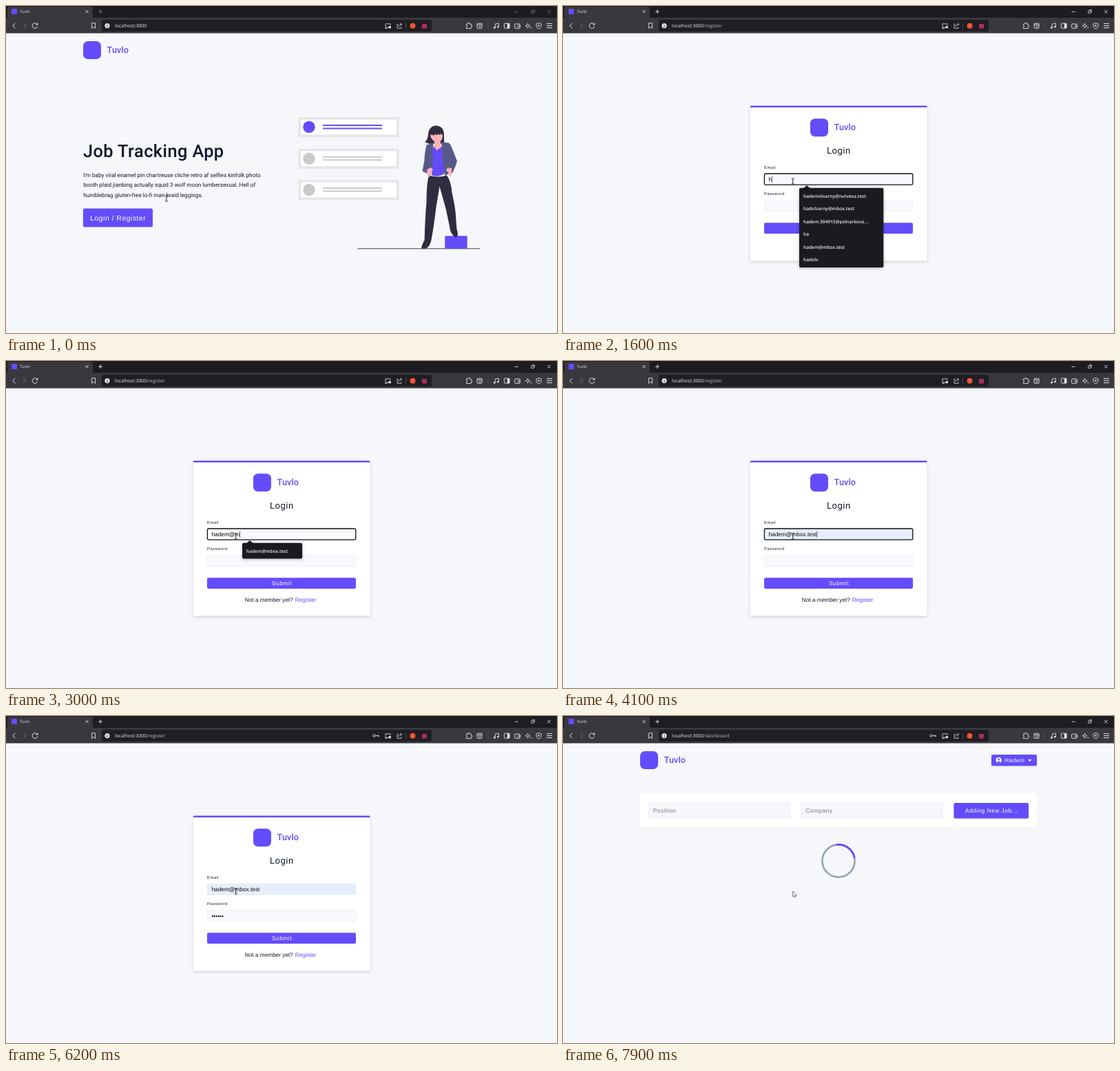
Write an HTML page with a canvas that moves like this. It is 800 px wide and 474 px high and loops after 8 s.

```html
<!DOCTYPE html>
<html lang="en">
<head>
<meta charset="utf-8">
<title>Tuvlo</title>
<style>
html, body { margin: 0; width: 100%; height: 100%; overflow: hidden; background: #f6f7fb; }
canvas { display: block; width: 800px; height: 474px; }
</style>
</head>
<body>
<canvas id="stage" width="800" height="474"></canvas>
<script>
const ctx = document.getElementById('stage').getContext('2d');
const LOOP = 8000, STEP = 100;
const PURPLE = '#644cfa', INK = '#0f172a', PAGE = '#f6f7fb', FIELD = '#f8f9fc';
const ARIAL = '"Liberation Sans", Arial, sans-serif';
const ROBOTO = 'Roboto, sans-serif';
const UI = '"Open Sans", "Noto Sans", sans-serif';
const REM = 8.333, GAP = 0.52;

const BRAND = 'Tuvlo', USER = 'Hadem', EMAIL = 'hadem@mbox.test';
const SAVED = ['hademolvarny@nulvexa.test', 'hadolvarny@mbox.test',
  'hadem.304915@pelnarkova....', 'ha', EMAIL, 'hadolv'];

const T = { active: 100, hover: 400, register: 800, leave: 1000, focus: 1300,
  filled: 3500, password: 4300, key: 4800, blur: 6000, dashboard: 7600 };
const EMAIL_KEYS = [1500, 1900, 2100, 2300, 2500, 2800, 3000];
const PASS_KEYS = [4700, 4900, 5000, 5200, 5300, 5500];

const typed = (keys, t) => keys.filter(k => k <= t).length;

function rect(x, y, w, h, fill, r = 0) {
  ctx.fillStyle = fill;
  ctx.beginPath();
  ctx.roundRect(x, y, w, h, r);
  ctx.fill();
}
function frame(x, y, w, h, color, line = 1, r = 0) {
  ctx.strokeStyle = color;
  ctx.lineWidth = line;
  ctx.beginPath();
  ctx.roundRect(x, y, w, h, r);
  ctx.stroke();
}
function disc(x, y, r, fill) {
  ctx.fillStyle = fill;
  ctx.beginPath();
  ctx.arc(x, y, r, 0, Math.PI * 2);
  ctx.fill();
}
function ring(x, y, r, color, line = 1, from = 0, to = Math.PI * 2) {
  ctx.strokeStyle = color;
  ctx.lineWidth = line;
  ctx.beginPath();
  ctx.arc(x, y, r, from, to);
  ctx.stroke();
}
function shape(d, fill) {
  ctx.fillStyle = fill;
  ctx.fill(new Path2D(d));
}
function stroke(d, color, line = 1) {
  ctx.strokeStyle = color;
  ctx.lineWidth = line;
  ctx.stroke(new Path2D(d));
}
function shadow(blur, dy, alpha, draw) {
  ctx.save();
  ctx.shadowColor = `rgba(0,0,0,${alpha})`;
  ctx.shadowBlur = blur;
  ctx.shadowOffsetY = dy;
  draw();
  ctx.restore();
}
function text(s, x, y, size, { font = ARIAL, weight = 400, color = INK, gap = 0, align = 'left' } = {}) {
  ctx.font = `${weight} ${size}px ${font}`;
  ctx.textRendering = 'geometricPrecision';
  ctx.letterSpacing = gap + 'px';
  ctx.textAlign = 'left';
  ctx.fillStyle = color;
  const w = ctx.measureText(s).width;
  ctx.fillText(s, align === 'center' ? x - (w - gap) / 2 : x, y);
  return w;
}

function brand(x, y) {
  rect(x, y, 26, 26, PURPLE, 7);
  text(BRAND, x + 34.6, y + 17, 12.8, { font: ROBOTO, weight: 500, color: PURPLE });
}

function browser(t) {
  const light = '#e4e4e8', dim = '#77767c';
  const ctl = t < T.active ? dim : '#f2f2f5';
  rect(0, 0, 800, 18, '#1d1c22');
  rect(2, 1, 124, 20, '#39383e', 3);
  rect(0, 17, 800, 22.5, '#39383e');
  rect(8, 4, 8, 8, PURPLE, 1);
  text(BRAND, 20, 10.4, 5.9, { font: UI, color: light });
  stroke('M115.7 6.2l3.8 3.8m0-3.8l-3.8 3.8', light, 0.9);
  stroke('M137 5.3v5.6m-2.8-2.8h5.6', ctl, 0.9);
  stroke('M738.5 8.3h5M786 5.8l4.8 4.8m0-4.8l-4.8 4.8', ctl, 0.8);
  frame(762.7, 6.8, 3.6, 3.6, ctl, 0.8, 0.6);
  stroke('M764 5.6h3.4v3.4', ctl, 0.7);

  stroke('M13.5 25l-3.8 3.6 3.8 3.6', light);
  stroke('M25 25l3.8 3.6-3.8 3.6', dim);
  ring(42, 28.6, 3.7, light, 1, 0.3, 5.5);
  shape('M46.3 24.2v3.2h-3.2z', light);

  rect(139, 20, 479, 17, '#1f1e24', 3);
  stroke('M124.6 24.7h4.9v7.7l-2.45-2.1-2.45 2.1z', light, 0.9);
  disc(147, 28.6, 3.6, light);
  rect(146.6, 28, 0.9, 2.7, '#1f1e24');
  rect(146.6, 26.4, 0.9, 0.9, '#1f1e24');
  const path = t < T.register ? '' : t < T.dashboard ? '/register' : '/dashboard';
  const w = text('localhost:3000', 158, 31, 6.85, { font: UI, color: '#f0f0f3' });
  text(path, 158 + w, 31, 6.85, { font: UI, color: '#bdbcc2' });

  if (t >= T.key) {
    ring(534.6, 28.6, 1.7, light, 0.9);
    stroke('M536.3 28.3h5v2m-1.7-2v1.5', light, 0.9);
  }
  stroke('M556 31.2h-5v-5.4h7v2M550 32.3h4', light, 0.8);
  rect(555.7, 29, 3.2, 3.2, light, 0.5);
  stroke('M570 26.3h-2v6h6v-2M570.3 30c.2-2 1.5-3.3 4-3.3m-1.6-2l2 2-2 2', light, 0.8);
  rect(580, 24.5, 0.7, 8.5, '#5a595f');
  disc(590.5, 28.8, 4, '#f4532d');
  rect(604, 26, 7, 6.5, '#b32a63');

  stroke('M668.5 26h2.2a1.2 1.2 0 1 1 2.3 0h2.2v2.3a1.2 1.2 0 1 1 0 2.3v2h-6.7v-2.2a1 1 0 1 0 0-2.2z', light, 0.9);
  frame(684, 25.3, 7.2, 7, light, 0.9, 1);
  stroke('M684 27.2h7', light, 0.9);
  ring(688, 29.8, 1.2, light, 0.7);
  rect(699.6, 24.5, 0.7, 8.5, '#5a595f');
  stroke('M710.3 31.3v-5.2l5-1v5', light, 0.9);
  disc(709.2, 31.4, 1.3, light);
  disc(714.2, 30.2, 1.3, light);
  frame(723.4, 25.2, 7.6, 7, light, 0.9, 0.8);
  rect(727.8, 25.2, 3.3, 7, light);
  frame(738.6, 26, 7.6, 6.4, light, 0.9, 1);
  frame(743, 28, 3.4, 2.4, light, 0.8, 0.5);
  stroke('M757.5 25l.9 2.7 2.7.9-2.7.9-.9 2.7-.9-2.7-2.7-.9 2.7-.9zM760.5 31.4h3', light, 0.8);
  stroke('M773.5 24.6l3.5 1.2v3c0 2-1.5 3.3-3.5 4.2-2-.9-3.5-2.2-3.5-4.2v-3z', light, 0.9);
  disc(773.5, 28.5, 1.2, light);
  for (const y of [25.6, 28.6, 31.6]) rect(785, y - 0.5, 8, 1, light);
}

function listRow(y, color) {
  rect(424.5, y, 146, 28.7, '#e5e5e6');
  rect(428, y + 3.3, 139, 22, '#fff');
  disc(440, y + 14.2, 8.7, color);
  rect(460, y + 10.8, 86, 1.9, color);
  rect(460, y + 15.3, 86, 1.9, color);
}

function woman() {
  const dark = '#2f2e41', skin = '#ffb2b5', coat = '#575a89';
  rect(510.5, 351.2, 177.5, 1.1, '#3f3d56');
  rect(637.3, 333.3, 32.4, 18.5, PURPLE);
  // legs and shoes
  shape('M614 245.5q13 4 26 0q6 8 7.5 25q5 22 5.500 34l1.500 21-9 1-7-33-9-32-5 30q-4 34-8 52h-9q1-38 3-59q0-27 3.500-39z', dark);
  shape('M607 340l9 1.500q0 5-2.500 7-3 4-8.500 3.500-3-1.500-1-5z', dark);
  shape('M644.500 322l9-1q3.500 8 2 12.500-2.500 3-5 .500-5-5-6-12z', dark);
  // hair, face and neck
  shape('M624 173.500c7 0 11.500 4.500 11.800 11l.4 13.500-4 1.500h-12c-4 1-9 0-12-3 4-2 4-6 5-12 1-7 5-11 10.800-11z', dark);
  shape('M615.800 183h18.200v5.500c0 5-3 8.500-7.500 8.500-6.500 0-10.700-4.500-10.700-14z', skin);
  shape('M622 193h8.800v8.500l2.500 4-5 4.500-8.500-5 2.200-3z', skin);
  shape('M614.500 186c0-8 4-12 10-12s10.500 4 10.800 12l-3 .8-1-2-1.800 2.300-2-1.500-2.500 1.800-1.500-2-2.500 2.200z', dark);
  // shirt and jacket
  shape('M620 203l6 6 6.500-5 5 15-1 24q-9 6-18 2.500l-2.500-22z', PURPLE);
  shape('M621 198l-10.500 3.500q-3 13-3 22l-3 16 8 3.500 4 2.500q3-14 3.500-24-2-13 1-23.500z', coat);
  shape('M632 197l11 1.500q3.500 3 5 8.500l7 18q-2.500 9-7 17l-5 1-5.500 3q-3.500-13-3.500-26z', coat);
  // hands
  shape('M611 237l6-3 3 3-2.500 4-2.500 7-3-2z', skin);
  shape('M647 235l-5.500-1-2.500 4 3 3 2 7 3-2.500z', skin);
  stroke('M612.500 219l-1.500 13 5 3M648 220l-3 13-3 3', '#454875', 0.6);
}

function home(t) {
  brand(112, 51);
  text('Job Tracking App', 112, 219, 25.4, { font: ROBOTO, weight: 500, gap: 0.4 });
  ["I'm baby viral enamel pin chartreuse cliche retro af selfies kinfolk photo",
    'booth plaid jianbing actually squid 3 wolf moon lumbersexual. Hell of',
    'humblebrag gluten-free lo-fi man braid leggings.'
  ].forEach((s, i) => text(s, 112.2, 248 + i * 14.4, 8.2, { font: ROBOTO }));

  const k = Math.min(1, Math.max(0, (t - T.hover + 100) / 300));
  const mix = (a, b) => Math.round(a + (b - a) * k);
  shadow(1 + 5 * k, 1 + 2 * k, 0.1 + 0.1 * k, () =>
    rect(112, 293.5, 101, 26.7, `rgb(${mix(100, 60)},${mix(76, 46)},${mix(250, 150)})`, 2));
  text('Login / Register', 122.2, 310.5, 10.4, { color: '#fff', gap: GAP });

  listRow(161.2, PURPLE);
  listRow(207, '#cacaca');
  listRow(252.300, '#cacaca');
  woman();
}

function input(y, value, focused, fill) {
  rect(292, y, 216, 16.5, fill, 2);
  if (focused) frame(292.4, y + 0.2, 215.4, 16.1, '#101014', 1.3, 2);
  else frame(292.3, y + 0.3, 215.4, 15.900, '#e6e9f1', 0.6, 2);
  const w = text(value, 298.4, y + 11.2, REM, { color: '#0a0a0c' });
  if (focused) rect(298.6 + w, y + 3.6, 0.6, 9.6, '#222');
}

function suggestions(prefix) {
  const rows = SAVED.filter(s => s.startsWith(prefix));
  ctx.font = `600 6.6px ${UI}`;
  ctx.letterSpacing = '0px';
  const w = Math.max(...rows.map(s => ctx.measureText(s).width)) + 27;
  shadow(4, 1, 0.3, () => {
    rect(343, 263.8, w, rows.length * 18.5 + 4.300, '#1b1a20', 2);
    shape('M349.5 264l4.500-4 4.500 4z', '#1b1a20');
  });
  rows.forEach((s, i) =>
    text(s, 349, 277.7 + i * 18.5, 6.6, { font: UI, weight: 600, color: '#ececf0' }));
}

function login(t) {
  shadow(4, 1.5, 0.16, () => rect(271.7, 144.5, 257, 225, '#fff', 2));
  rect(271.7, 144.5, 257, 2.6, PURPLE, [2, 2, 0, 0]);
  brand(359, 163.3);
  text('Login', 400, 213.7, 13, { font: ROBOTO, gap: GAP, align: 'center' });
  text('Email', 292, 235.9, 5.83, { gap: GAP });
  text('Password', 292, 274.2, 5.83, { gap: GAP });

  const filled = t >= T.filled;
  const value = filled ? EMAIL : EMAIL.slice(0, typed(EMAIL_KEYS, t));
  input(242.8, value, t >= T.focus && t < T.password, filled ? '#e7eefb' : FIELD);
  input(281.4, '•'.repeat(typed(PASS_KEYS, t)), t >= T.password && t < T.blur, FIELD);

  rect(292, 314.200, 216, 15.800, PURPLE, 2);
  text('Submit', 400.2, 325, REM, { color: '#fff', gap: GAP, align: 'center' });
  text('Not a member yet?', 346.8, 348.5, 8.25);
  text('Register', 419.8, 348.5, 8.25, { color: PURPLE });
  if (value && !filled) suggestions(value);
}

function dashboard(t) {
  brand(112, 51);
  shadow(2, 1, 0.12, () => rect(622, 56, 66, 16.200, PURPLE, 2));
  disc(632.7, 64.2, 4.1, '#fff');
  disc(632.7, 62.900, 1.4, PURPLE);
  shape('M630 67q2.700-3.500 5.400 0q-2.700 1.800-5.400 0z', PURPLE);
  text(USER, 641, 67.2, REM, { color: '#fff', gap: GAP });
  shape('M675 63h5.600l-2.800 3z', '#fff');

  rect(112, 113, 576, 47.700, '#fff', 2);
  [[124.3, 'Position'], [345.800, 'Company']].forEach(([x, label]) => {
    rect(x, 125.700, 205.500, 22.700, PAGE, 2);
    frame(x + 0.3, 126, 204.900, 22.100, '#e6e9f1', 0.6, 2);
    text(label, x + 6.4, 139.7, REM, { color: '#757680', gap: GAP });
  });
  shadow(2, 1, 0.1, () => rect(567.4, 125.9, 108.600, 22.500, PURPLE, 2));
  text('Adding New Job...', 621.6, 139.7, REM, { color: '#fff', gap: GAP, align: 'center' });

  // one turn every 600 ms
  const turn = ((t - 7840) * 0.6 - 135) * Math.PI / 180;
  ring(400, 210, 23.6, '#94a3b8', 2.6);
  ring(400, 210, 23.6, PURPLE, 2.6, turn, turn + Math.PI / 2);
}

function status() {
  rect(0, 463, 69, 11, '#3a393f', [0, 2, 0, 0]);
  rect(0, 463.5, 68.5, 10.5, '#1b1a20', [0, 2, 0, 0]);
  text('localhost:3000/register', 2, 470.9, 5.9, { font: UI, color: '#f0f0f3' });
}

function glide(t, start, end, a, b) {
  const p = Math.min(1, Math.max(0, (t - start) / (end - start)));
  const e = p * p * (3 - 2 * p);
  return [a[0] + (b[0] - a[0]) * e, a[1] + (b[1] - a[1]) * e];
}

function pointer(t) {
  const [x, y] = t < T.leave
    ? glide(t, 0, 500, [233, 279], [192, 303])
    : glide(t, T.leave, T.focus, [192, 303], [333.7, 254]);
  const beam = t < T.hover || (t >= T.focus && t < T.dashboard);
  ctx.save();
  ctx.translate(x, y);
  if (beam) {
    stroke('M-2-4.200q1.500 0 2 .800q.500-.800 2-.800M0-3.500v7M-2 4.200q1.500 0 2-.800q.500.800 2 .800', '#111', 0.9);
  } else if (t < T.register) {
    const hand = 'M-1-1.500q.9-.8 1.600 0v3l4 .800q1 .500.700 2l-1 3.700h-4.500l-3-4q.300-1.200 1.400-.500l.800.700z';
    shape(hand, '#fff');
    stroke(hand, '#111', 0.6);
  } else {
    const arrow = 'M0 0v8l1.900-1.700 1.300 2.600 1.200-.600-1.200-2.500h2.500z';
    shape(arrow, '#fff');
    stroke(arrow, '#222', 0.6);
  }
  ctx.restore();
}

function render(t) {
  rect(0, 0, 800, 474, PAGE);
  if (t < T.register) home(t);
  else if (t < T.dashboard) login(t);
  else dashboard(t);
  browser(t);
  if (t >= T.hover && t <= T.leave) status();
  pointer(t);
}

function tick() {
  const t = performance.now() % LOOP;
  render(Math.floor(t / STEP) * STEP);
  requestAnimationFrame(tick);
}
tick();
</script>
</body>
</html>
```
